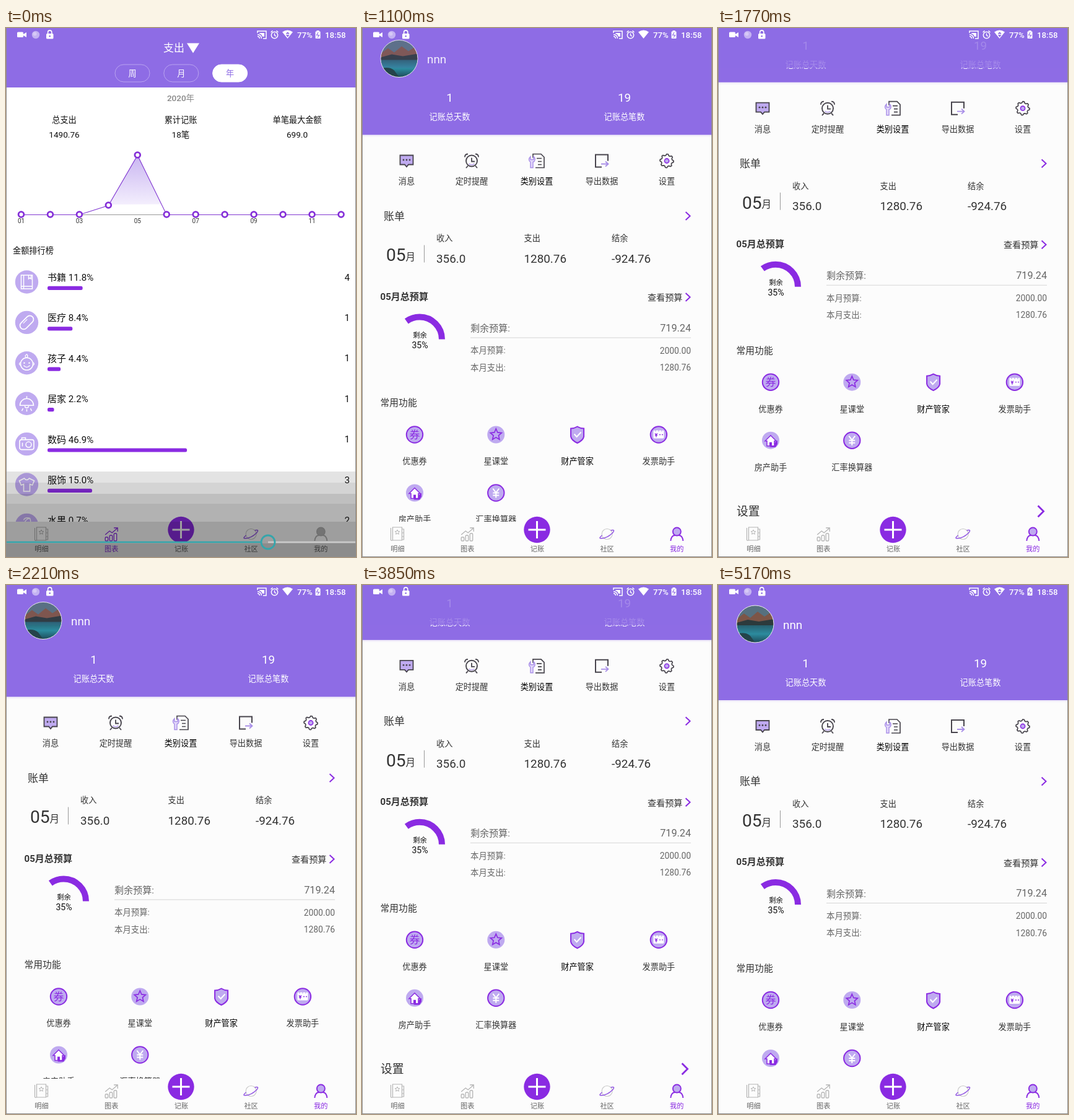
Write an HTML page with a canvas that moves like this. It is 565 px wide and 854 px high and loops after 5.59 s.

```html
<!DOCTYPE html>
<html lang="zh">
<head>
<meta charset="utf-8">
<style>
html, body { margin: 0; width: 100%; height: 100%; overflow: hidden; background: #fff; }
canvas { display: block; }
</style>
</head>
<body>
<canvas id="stage" width="565" height="854"></canvas>
<script>
const W = 565, H = 854, LOOP = 5590;
const MAX = 121.5, REST = 5.5, NAV = 797;
const BAR = '#8e6ce5', DEEP = '#8a2be2', LAV = '#bfaaf0', INK = '#333', DARK = '#48454d', MUTE = '#666';
const c = document.getElementById('stage').getContext('2d');
const FONT = 'Roboto, "Noto Sans CJK SC", "Noto Sans CJK", sans-serif';

// Stepped progress: n equal jumps, the first at a and the last at b
function ramp(t, a, b, n) {
  if (t < a) return 0;
  if (t >= b) return 1;
  return (Math.floor((t - a) / (b - a) * (n - 1) + 1e-6) + 1) / n;
}

function scrollAt(t) {
  return MAX * ramp(t, 1100, 1610, 9) - (MAX - REST) * ramp(t, 1690, 2210, 10)
    + (MAX - REST) * ramp(t, 2610, 2800, 4) - MAX * ramp(t, 3740, 4290, 10);
}

// y is the optical middle of the glyphs
function text(s, x, y, size, color = INK, align = 'left', weight = 400) {
  c.font = `${weight} ${size}px ${FONT}`;
  c.textAlign = align;
  c.fillStyle = color;
  c.fillText(s, x, y + size * 0.37);
}
const mid = (s, x, y, size, color, weight) => text(s, x, y, size, color, 'center', weight);

function box(x, y, w, h, color) {
  c.fillStyle = color;
  c.fillRect(x, y, w, h);
}

function paint(path, fill, stroke, lw = 1.5) {
  if (fill) { c.fillStyle = fill; c.fill(path); }
  if (stroke) { c.strokeStyle = stroke; c.lineWidth = lw; c.stroke(path); }
}

function disc(x, y, r, fill, stroke, lw) {
  const p = new Path2D();
  p.arc(x, y, r, 0, Math.PI * 2);
  paint(p, fill, stroke, lw);
}

function pill(x, y, w, h, r, fill, stroke, lw) {
  const p = new Path2D();
  p.roundRect(x, y, w, h, r);
  paint(p, fill, stroke, lw);
}

function at(x, y, draw) {
  c.save();
  c.translate(x, y);
  draw();
  c.restore();
}

const line = (d, stroke, lw, fill) => paint(new Path2D(d), fill, stroke, lw);

function radial(n, radius, fill, stroke, lw) {
  const p = new Path2D();
  for (let i = 0; i < n; i++) {
    const a = i / n * Math.PI * 2 - Math.PI / 2, r = radius(i);
    p.lineTo(Math.cos(a) * r, Math.sin(a) * r);
  }
  p.closePath();
  paint(p, fill, stroke, lw);
}
const star = (r, color, lw) => radial(10, i => i % 2 ? r * 0.46 : r, null, color, lw);

function chevron(x, y, w, h, lw) {
  line(`M${x - w / 2} ${y - h / 2}l${w} ${h / 2}l${-w} ${h / 2}`, DEEP, lw);
}

function statusBar(marked) {
  const w = '#fff';
  pill(18, 6.5, 10, 8.5, 1.5, w);
  line('M28 10l5-3v8l-5-3z', null, 0, w);
  disc(48, 11, 6.2, '#c4b2f2');
  disc(46.5, 9.5, 3, '#d6c9f6');
  pill(65, 9, 11.5, 8.5, 1.5, w);
  line('M67.6 9V7a3.1 3.1 0 0 1 6.2 0v2', w, 1.6);
  disc(70.7, 13.2, 1.3, BAR);
  line('M406 8V5h14v12h-5M406 10.5a6.5 6.5 0 0 1 6.5 6.5M406 13.5a3.5 3.5 0 0 1 3.5 3.5', w, 1.5);
  line('M409 8h8v6h-3q-1-4-5-5z', null, 0, w);
  disc(433.5, 11.5, 5.2, null, w, 1.5);
  line('M433.5 8.5v3.3l2.4 1.5M427.5 7l3-2.6M439.5 7l-3-2.6', w, 1.4);
  line('M446 6.5Q454.5 0.5 463 6.5L454.5 17z', null, 0, w);
  if (marked) line('M452.3 9.5l2.4-2.3 2.4 2.3M453 11.5h3.4l-1.7 2.4z', BAR, 1.2, BAR);
  text('77%', 470, 11, 13.2, w, 'left', 500);
  pill(499.5, 5.5, 8, 11.5, 1, w);
  box(501.5, 4, 4, 2, w);
  line('M504 7l-2.5 4.5h4L503 15.5', BAR, 1.1);
  text('18:58', 515, 11, 13.2, w, 'left', 500);
}

// ---- chart page ----
const rowIcons = [
  () => line('M-9-11H9V11H-9zM-5-11V11M-9 7H9M3-11v6l2-1.500 2 1.500v-6', '#fff', 1.5),
  () => { c.rotate(-Math.PI / 4); pill(-13, -6, 26, 12, 6, null, '#fff', 1.7); line('M-5-3H4', '#fff', 1.2); },
  () => {
    disc(0, 1.5, 10, null, '#fff', 1.5);
    line('M-10-1q-4 2.500 0 5M10-1q4 2.500 0 5M0-8q-5-3 0-6q3 3 0 6M-5 4q5 5.500 10 0', '#fff', 1.3);
    disc(-4, 0, 1.2, '#fff'); disc(4, 0, 1.2, '#fff');
  },
  () => line('M0-12v4M-11 3a11 11 0 0 1 22 0zM-3 4a3 3 0 0 0 6 0M0 9v4M-6 8l-2 4M6 8l2 4', '#fff', 1.5),
  () => {
    pill(-11.5, -7, 23, 16, 3, null, '#fff', 1.6);
    disc(3, 1, 4.5, null, '#fff', 1.5);
    line('M-8-7v-3h6v3M-7-2v6', '#fff', 1.5);
  },
  () => line('M-4-10q4 5 8 0l8 4-3 7-4-1.500V11H-5V-0.500L-9 1l-3-7z', '#fff', 1.6),
  () => {
    disc(-4, 4, 6, null, '#fff', 1.5); disc(6, 3, 5, null, '#fff', 1.5);
    line('M-4-2q2-8 9-9q2 4 1 9M5-11q-8-2-10 3', '#fff', 1.4);
  }
];
const rows = [['书籍', 11.8, 4], ['医疗', 8.4, 1], ['孩子', 4.4, 1], ['居家', 2.2, 1],
  ['数码', 46.9, 1], ['服饰', 15.0, 3], ['水果', 0.7, 2]];

function lineChart() {
  const base = 301, px = i => 24.5 + i * 46.95;
  const py = i => i === 4 ? 205 : i === 3 ? 286 : base;
  const g = c.createLinearGradient(0, 205, 0, 286);
  g.addColorStop(0, '#c9b5f1');
  g.addColorStop(1, '#f4effd');
  line(`M${px(3)} 285L${px(4)} 205L251 284.500z`, null, 0, g);
  line(`M${px(0)} 301.500H${px(11)}`, '#999', 1);
  const p = new Path2D();
  for (let i = 0; i < 12; i++) p.lineTo(px(i), py(i) + 0.5);
  paint(p, null, '#8138d2', 1.1);
  for (let i = 0; i < 12; i++) {
    disc(px(i), py(i), 4.4, '#fff', '#8530d8', 2.8);
    if (i % 2 === 0) mid(String(i + 1).padStart(2, '0'), px(i), 311, 10, '#333');
  }
}

function chartPage() {
  box(0, 0, W, H, '#fff');
  box(0, 0, W, 96, BAR);
  text('支出', 254, 32, 16.95, '#fff');
  line('M292 24.500h20l-10 16z', null, 0, '#fff');
  ['周', '月', '年'].forEach((s, i) => {
    const x = 204 + i * 78.8, on = i === 2;
    pill(x - 28, 59, 56, 28, 14, on ? '#fff' : null, on ? '#fff' : '#b9a3f0', 1);
    mid(s, x, 73, 13.2, on ? BAR : '#fff');
  });
  mid('2020年', 282, 113, 13.5, '#888', 500);
  [['总支出', '1490.76'], ['累计记账', '18笔'], ['单笔最大金额', '699.0']].forEach(([a, b], i) => {
    mid(a, 94 + i * 188, 148, 13.2, '#111');
    mid(b, 94 + i * 188, 172, 13.6, '#111');
  });
  lineChart();
  text('金额排行榜', 11, 359, 13.2, '#111');
  rows.forEach(([name, pct, count], i) => {
    const y = 410 + i * 65.4;
    disc(33.5, y, 18.7, LAV);
    at(33.5, y, rowIcons[i]);
    text(`${name} ${pct.toFixed(1)}%`, 67, y - 7.5, 15.06, '#111');
    text(String(count), 555, y - 8, 15.06, '#111', 'right');
    pill(67, y + 6.8, Math.max(6, pct * 4.8), 6.2, 2.5, DEEP);
  });
}

// ---- profile page ----
const menu = [
  ['消息', () => {
    line('M-10.500-9H10.500V6H3L0 9.500-3 6H-10.500z', DARK, 1.8, LAV);
    [-5, 0, 5].forEach(x => disc(x, -1.5, 1.4, DARK));
  }],
  ['定时提醒', () => {
    disc(0, 0, 9, null, DARK, 1.9);
    line('M0-5V1H5M-11-6q0-5 5-5M11-6q0-5-5-5M-6 8l-3 3.500M6 8l3 3.500', DARK, 1.8);
    line('M-4.500 4.500q4.500 3.500 9 0', LAV, 1.6);
  }],
  ['类别设置', () => {
    line('M-6-5v-6H7l5 5V11H-2M0-4H8M2 1H8M2 6H8', DARK, 1.7);
    line('M-10-7v5h5v-5q4 3 1 8l-2 1V11h-4V2q-5-4 0-9z', '#a98fe8', 1.4, '#e4dafa');
  }],
  ['导出数据', () => {
    line('M10 0V-10H-10V10H0', DARK, 2);
    line('M-1 5H10M6 1l4.500 4-4.500 4', '#a98fe8', 1.8);
  }],
  ['设置', () => {
    radial(32, i => i % 4 < 2 ? 11 : 8.8, null, DARK, 1.7);
    disc(0, 0, 3.6, LAV, DEEP, 1.6);
  }]
];
const ring = () => disc(0, 0, 13.2, LAV, DEEP, 2);
const tools = [
  ['优惠券', () => { ring(); mid('券', 0, 0, 17, DEEP, 500); }],
  ['星课堂', () => { disc(0, 0, 14, LAV); star(9.5, DEEP, 1.7); }],
  ['财产管家', () => {
    line('M0-13q5 3 10.500 3V3q-1 6-10.500 10.500Q-9.500 9-10.500 3V-10Q-5-10 0-13z', DEEP, 2, LAV);
    line('M-5-1l4 4.500L6-4', '#fff', 2);
  }],
  ['发票助手', () => {
    ring();
    pill(-8.5, -7, 17, 13, 1.5, '#fff');
    line('M-6-2l2 2 2-2M-4 0v4M-6 1h4M1 0h2M5 0h2', DEEP, 1.3);
    line('M-5-8v3M0-8v3M5-8v3', LAV, 1.3);
  }],
  ['房产助手', () => {
    disc(0, 0, 14, LAV);
    line('M-2 11L8 11 11 6V0z', null, 0, DEEP);
    line('M-9 1L0-8 9 1H6V9H-6V1z', DEEP, 1.5, '#fff');
    box(-2, 3, 4, 6, DEEP);
  }],
  ['汇率换算器', () => { ring(); line('M-5-7l5 6.500 5-6.500M0 0V8M-5 0H5M-5 4H5', '#fff', 2); }]
];

function avatar(y) {
  at(60, y, () => {
    c.save();
    c.beginPath();
    c.arc(0, 0, 30, 0, Math.PI * 2);
    c.clip();
    box(-30, -30, 60, 60, '#56707f');
    line('M-30-8L-18-17-8-10 4-20 15-12 24-18 30-12V4H-30z', null, 0, '#7d5547');
    line('M-30-2L-12-7 6-4 30-8V4H-30z', null, 0, '#2c3a3c');
    const g = c.createLinearGradient(0, 2, 0, 30);
    g.addColorStop(0, '#27606f');
    g.addColorStop(0.5, '#2c8b9e');
    g.addColorStop(1, '#1d4a58');
    box(-30, 2, 60, 28, g);
    line('M-30 16q14-4 22 3l8 11H-30z', null, 0, '#24434a');
    c.restore();
    disc(0, 0, 30, null, '#eee', 1);
  });
}

function profileBody() {
  menu.forEach(([s, icon], i) => {
    const x = 72 + i * 105;
    at(x, 228, icon);
    mid(s, x, 261, 13.2, i === 2 ? '#000' : INK);
  });
  text('账单', 35, 317, 16.95, INK, 'left', 500);
  chevron(526, 317, 7, 13, 2);
  text('05', 39, 379.5, 28.2);
  text('月', 70.5, 383, 15.5);
  box(100, 364, 1, 28, '#999');
  [['收入', '356.0'], ['支出', '1280.76'], ['结余', '-924.76']].forEach(([a, b], i) => {
    text(a, 120 + i * 141.5, 353, 13.2);
    text(b, 120 + i * 141.5, 385.5, 18.85);
  });

  text('05月总预算', 29.5, 446.5, 15.06, INK, 'left', 700);
  text('查看预算', 461, 448.5, 14.12);
  chevron(526, 448, 7, 13, 2);
  c.beginPath();
  c.arc(93, 516, 36, 0, -0.7 * Math.PI, true);
  c.strokeStyle = DEEP;
  c.lineWidth = 10;
  c.stroke();
  mid('剩余', 93.5, 509, 11.3, '#111');
  mid('35%', 93.5, 525, 14.12, '#111');
  text('剩余预算:', 175, 498, 15.06, MUTE);
  text('719.24', 531, 497.5, 16.2, MUTE, 'right');
  box(175, 513, 356, 1, '#d6d6d6');
  [['本月预算:', '2000.00'], ['本月支出:', '1280.76']].forEach(([a, b], i) => {
    text(a, 175, 534 + i * 27.5, 13.4, MUTE);
    text(b, 531, 534 + i * 27.5, 13.8, MUTE, 'right');
  });

  text('常用功能', 29.5, 618.5, 14.8, INK, 'left', 500);
  tools.forEach(([s, icon], i) => {
    const x = 85 + i % 4 * 131.3, y = 670 + Math.floor(i / 4) * 94;
    at(x, y, icon);
    mid(s, x, y + 43, 13.2, i === 2 ? '#000' : INK);
  });
  text('设置', 30, 878.5, 18.85);
  chevron(521, 878.5, 9, 18, 2.8);
}

function profilePage(s) {
  box(0, 0, W, H, '#fcfcfc');
  at(0, -s, () => {
    profileBody();
    box(0, 186, W, 3, '#f3f0fa');
    box(0, 0, W, 186, BAR);
    avatar(63);
    text('nnn', 105, 64, 18.85, '#fff');
    [['1', '记账总天数'], ['19', '记账总笔数']].forEach(([a, b], i) => {
      mid(a, 141.5 + i * 282, 126, 18.85, '#fff');
      mid(b, 141.5 + i * 282, 157, 13.2, '#fff');
    });
  });
  // toolbar closes over the header while it collapses
  c.globalAlpha = s / MAX;
  box(0, 0, W, 64.5, BAR);
  c.globalAlpha = 1;
  if (s > MAX - 1) mid('我的', 282.5, 43.5, 16.95, '#fff', 500);
}

// ---- bottom navigation ----
const navItems = [
  ['明细', k => {
    line('M-8-11H7V10H-8zM-11-10v19q0 2 3 1M7-8h3V9H7M7-2h3M7 4h3', k, 1.2);
    at(-0.5, -3, () => star(4, k, 1));
  }],
  ['图表', k => {
    [[-10, 6], [-3, 9], [4, 12]].forEach(([x, h]) => pill(x, 11 - h, 4.5, h, 1.2, null, k, 1.3));
    line('M-10 1L-3-5 1-2 9-9M4-10h6v6', k, 1.3);
  }],
  ['记账', () => {}],
  ['社区', () => {
    disc(0, 0, 8.5, null, '#c8c8c8', 1.1);
    line('M-8 2Q-14 7-10 7 0 7 9-2 14-8 6-6', '#9257e2', 1.5);
  }],
  ['我的', (k, on) => {
    disc(0, -4, 6.5, on ? LAV : '#bbb', k, 1.9);
    line('M-10 11q1-9 7-9M10 11q-1-9-7-9', k, 1.9);
  }]
];

function navBar(active, bg) {
  box(0, NAV, W, H - NAV, bg);
  navItems.forEach(([s, icon], i) => {
    const x = 57.5 + i * 112.7, on = i === active;
    at(x, 817, () => icon(on ? DEEP : '#b4b4b4', on));
    mid(s, x, 841, 11.2, on ? DEEP : MUTE);
  });
  disc(282.5, 810, 21.2, DEEP);
  line('M268.500 810h28M282.500 796v28', '#fff', 3);
}

// Player controls fading out over the screen
function player(alpha) {
  const tops = [716, 734, 752, 768, 797, 832], shade = [0.11, 0.17, 0.25, 0.3, 0.38, 0.45];
  c.globalAlpha = alpha;
  tops.forEach((y, i) => box(0, y, W, (tops[i + 1] || H) - y, `rgba(0,0,0,${shade[i]})`));
  box(423, 828.7, W - 423, 2.6, 'rgba(255,255,255,.45)');
  box(0, 828.7, 412, 2.6, '#35a5ab');
  disc(423, 830, 11, null, '#35a5ab', 2.8);
  c.globalAlpha = 1;
}

function draw(t) {
  const chart = t < 190;
  if (chart) chartPage(); else profilePage(scrollAt(t));
  statusBar(chart || t >= 1390 && t < 2000 || t >= 5170);
  navBar(chart ? 1 : 4, chart ? '#fff' : '#fcfcfc');
  const fade = 1 - ramp(t, 60, 630, 10);
  if (fade > 0) player(fade);
  c.strokeStyle = '#8c8c8c';
  c.lineWidth = 1;
  c.strokeRect(0.5, -2, W - 1, H + 1.5);
}

const start = performance.now();
function tick() {
  draw((performance.now() - start) % LOOP);
  requestAnimationFrame(tick);
}
tick();
</script>
</body>
</html>
```
